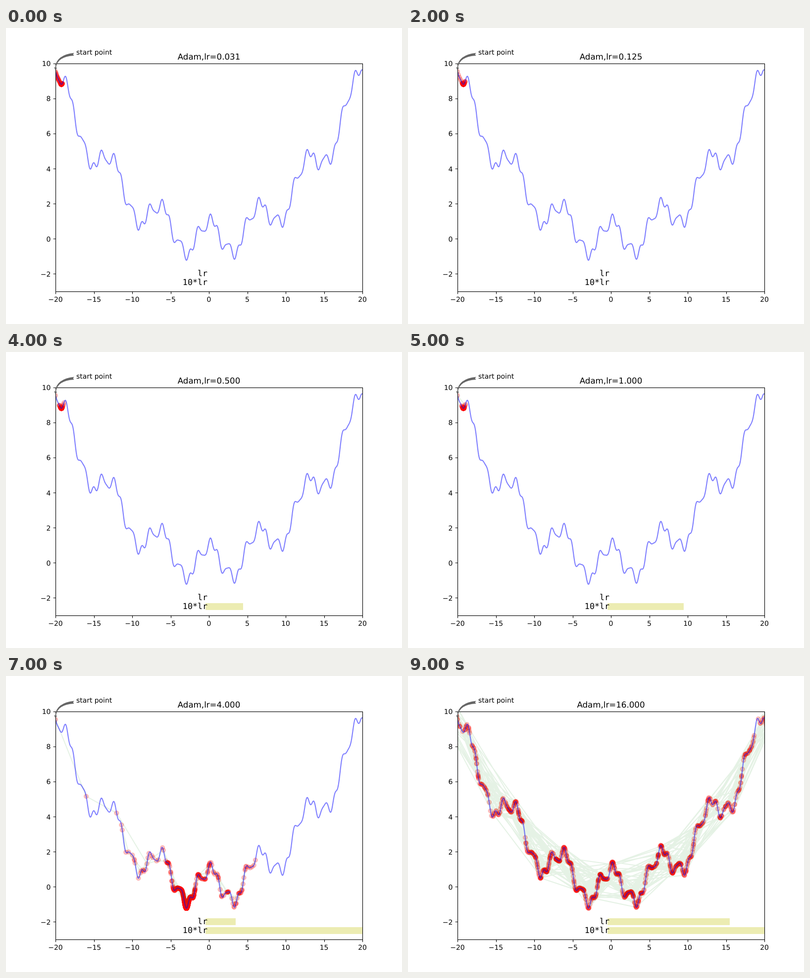
Write an HTML page with a canvas that moves like this. It is 800 px wide and 600 px high and loops after 10 s.

```html
<!DOCTYPE html>
<html lang="en">
<head>
<meta charset="utf-8">
<title>Learning rates</title>
<style>
  html, body { margin: 0; width: 100%; height: 100%; overflow: hidden; background: #fff; }
  canvas, svg { position: absolute; left: 0; top: 0; width: 800px; height: 600px; }
  text { font: 13.89px "DejaVu Sans", sans-serif; text-rendering: geometricPrecision; }
  .title { font-size: 16.67px; }
  .mono { font: 16.67px "DejaVu Sans Mono", monospace; }
  .mid { text-anchor: middle; }
  .end { text-anchor: end; }
  .axis { fill: none; stroke: #000; stroke-width: 1.11; }
</style>
</head>
<body>
<canvas width="800" height="600"></canvas>
<svg viewBox="0 0 800 600">
  <rect class="axis" x="100.5" y="72.5" width="620" height="462"/>
  <path class="axis" id="ticks"/>
  <g id="labels"></g>
  <text class="title mid" id="title" x="410" y="64"></text>
  <text class="mono end" x="407" y="503">lr</text>
  <text class="mono end" x="407" y="521">10*lr</text>
  <path fill="#666" d="M137.5 50.6Q101.5 54.5 99.4 80L97.3 79.6L99.9 86L103 80.6L101 80.3Q103.5 58 137.5 56L135.5 53.4Z"/>
  <text x="142" y="54">start point</text>
</svg>
<script>
const ctx = document.querySelector('canvas').getContext('2d');
const title = document.getElementById('title');
const STEPS = 1000, RUNS = 10, HOLD = 1000;

const px = x => 100 + (x + 20) * 15.5;
const py = y => 72 + (10 - y) * 462 / 13;
const snap = v => Math.floor(v + 0.5);

const loss = x => (0.15 * x) ** 2 + Math.cos(x) + Math.sin(3 * x) / 3
  + Math.cos(5 * x) / 5 + Math.sin(7 * x) / 7;
const slope = x => 0.045 * x - Math.sin(x) + Math.cos(3 * x)
  - Math.sin(5 * x) + Math.cos(7 * x);

// Adam descent with both decay rates at 0.9
function descend(rate) {
  const decay = 0.9, path = [];
  let x = -20, m = 0, v = 0;
  for (let t = 1; t <= STEPS; t++) {
    path.push([px(x), py(loss(x))]);
    const g = slope(x), fix = 1 - decay ** t;
    m = decay * m + (1 - decay) * g;
    v = decay * v + (1 - decay) * g * g;
    x -= rate * (m / fix) / (Math.sqrt(v / fix) + 1e-8);
  }
  return path;
}

function strokeLine(points, color) {
  ctx.beginPath();
  for (const [x, y] of points) ctx.lineTo(x, y);
  ctx.strokeStyle = color;
  ctx.stroke();
}

function drawDot([x, y]) {
  ctx.beginPath();
  ctx.arc(x, y, 4.167, 0, 2 * Math.PI);
  ctx.fill();
  ctx.stroke();
}

function drawBar(value, y) {
  const count = Math.floor(value), half = 6.945;
  if (count < 2) return;
  const left = 410 - half, right = snap(px(count - 1)) + half;
  ctx.fillStyle = 'rgba(191,191,0,.3)';
  ctx.fillRect(left, snap(py(y)) - half, right - left, 2 * half);
}

const curve = Array.from({ length: 801 }, (_, i) => {
  const x = -20 + i / 20;
  return [px(x), py(loss(x))];
});

function drawRun(run) {
  const rate = 2 ** (run - 5);
  const path = descend(rate);
  title.textContent = 'Adam,lr=' + (Math.floor(rate * 1000) / 1000).toFixed(3);
  ctx.clearRect(0, 0, 800, 600);
  ctx.save();
  ctx.beginPath();
  ctx.rect(100, 72, 621, 463);
  ctx.clip();
  ctx.lineWidth = 2.083;
  ctx.lineJoin = 'round';
  ctx.fillStyle = ctx.strokeStyle = 'rgba(255,0,0,.2)';
  path.forEach(drawDot);
  strokeLine(path, 'rgba(0,128,0,.1)');
  strokeLine(curve, 'rgba(0,0,255,.5)');
  drawBar(rate, -2);
  drawBar(10 * rate, -2.5);
  ctx.restore();
}

function buildAxes() {
  let ticks = '', labels = '';
  const name = v => String(v).replace('-', '\u2212');
  for (let v = -20; v <= 20; v += 5) {
    ticks += `M${snap(px(v)) + 0.5} 534.5v4.86`;
    labels += `<text class="mid" x="${px(v)}" y="555">${name(v)}</text>`;
  }
  for (let v = -2; v <= 10; v += 2) {
    ticks += `M100.5 ${snap(py(v)) + 0.5}h-4.86`;
    labels += `<text class="end" x="90.3" y="${snap(py(v) + 5.3)}">${name(v)}</text>`;
  }
  document.getElementById('ticks').setAttribute('d', ticks);
  document.getElementById('labels').innerHTML = labels;
}

let shown = -1;
function tick(now) {
  const run = Math.floor(now / HOLD) % RUNS;
  if (run !== shown) drawRun(shown = run);
  requestAnimationFrame(tick);
}

buildAxes();
tick(performance.now());
</script>
</body>
</html>
```
